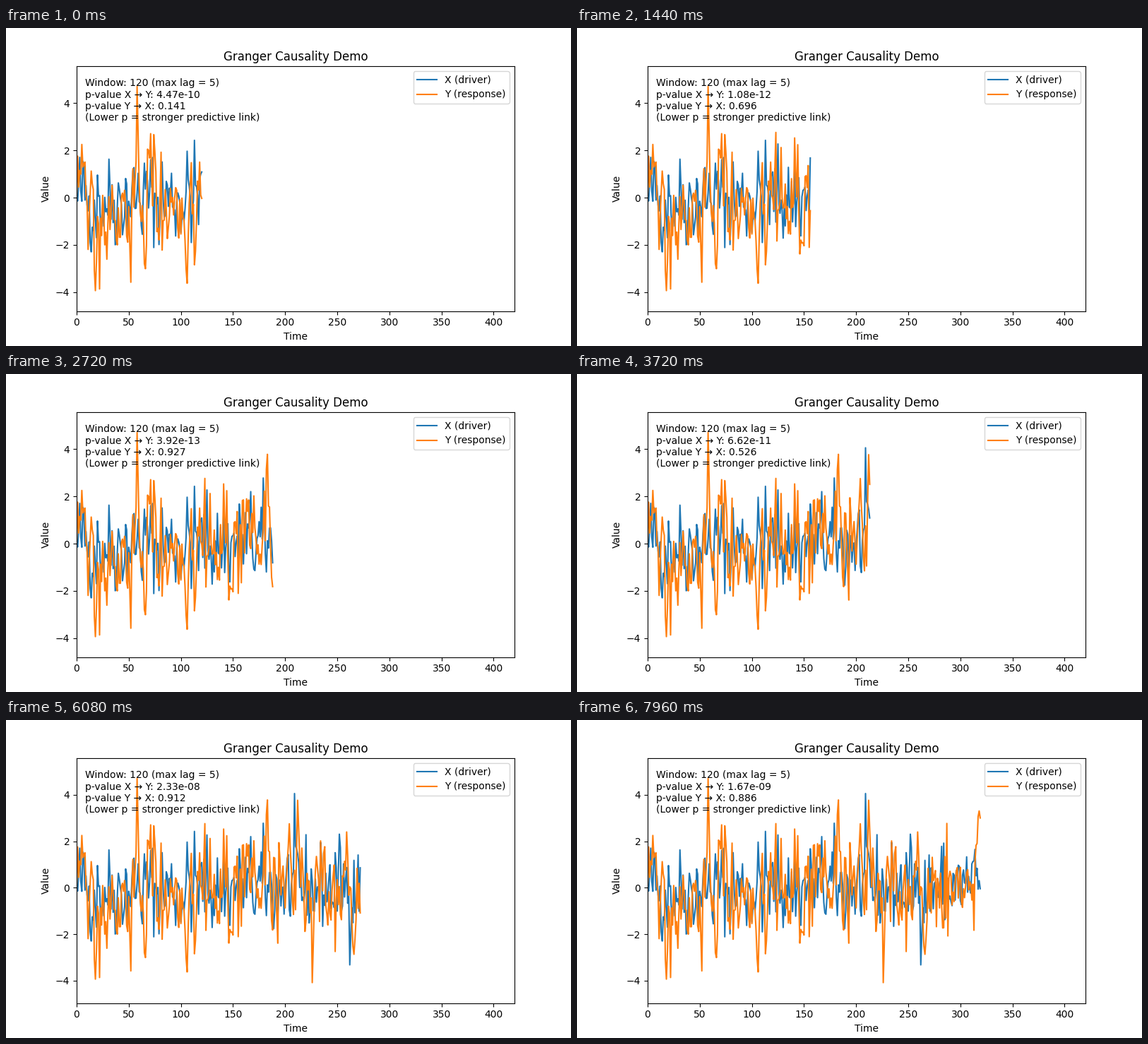
These frames come from a looping animation (800 by 450 pixels, 8 s). A matplotlib script:

```python
import math

import matplotlib.pyplot as plt
import numpy as np
from matplotlib.animation import FuncAnimation

N, WINDOW, LAG = 420, 120, 5
FRAMES, INTERVAL = 200, 40


def simulate():
    np.random.seed(42)
    ex = np.random.randn(N)
    ey = np.random.randn(N)
    x, y = np.zeros(N), np.zeros(N)
    for t in range(1, N):
        x[t] = 0.3 * x[t - 1] + ex[t]
        y[t] = 0.4 * y[t - 1] + ey[t]
        if t >= 3:
            y[t] += 0.8 * x[t - 3]
    return x, y


def beta_inc(a, b, z):
    """Regularised incomplete beta function by its power series."""
    log_front = (a * math.log(z) + b * math.log(1 - z) - math.log(a)
                 + math.lgamma(a + b) - math.lgamma(a) - math.lgamma(b))
    term = total = 1.0
    for k in range(20000):
        term *= z * (a + b + k) / (a + 1 + k)
        total += term
        if term < 1e-12 * total:
            break
    return math.exp(log_front) * total


def rss(target, columns):
    design = np.column_stack([np.ones(len(target))] + columns)
    coef = np.linalg.lstsq(design, target, rcond=None)[0]
    return np.sum((target - design @ coef) ** 2)


def granger_p(cause, effect):
    """F-test p-value that lags of cause help to predict effect."""
    def lags(s):
        return [s[LAG - k:len(s) - k] for k in range(1, LAG + 1)]

    target = effect[LAG:]
    small = rss(target, lags(effect))
    full = rss(target, lags(effect) + lags(cause))
    dof = len(target) - 2 * LAG - 1
    f = (small - full) / LAG / (full / dof)
    return beta_inc(dof / 2, LAG / 2, dof / (dof + LAG * f))


x, y = simulate()
time = np.arange(N)

fig, ax = plt.subplots(figsize=(8, 4.5), dpi=100)
line_x, = ax.plot([], [], label="X (driver)")
line_y, = ax.plot([], [], label="Y (response)")
ax.set_xlim(0, N)
ax.set_title("Granger Causality Demo")
ax.set_xlabel("Time")
ax.set_ylabel("Value")
ax.legend(loc="upper right")
info = ax.text(0.02, 0.95, "", transform=ax.transAxes, va="top")


def update(frame):
    now = WINDOW + frame
    shown = slice(0, now + 1)
    line_x.set_data(time[shown], x[shown])
    line_y.set_data(time[shown], y[shown])

    low = min(x[shown].min(), y[shown].min())
    high = max(x[shown].max(), y[shown].max())
    pad = 0.1 * (high - low)
    ax.set_ylim(low - pad, high + pad)

    wx, wy = x[now - WINDOW:now], y[now - WINDOW:now]
    info.set_text(
        f"Window: {WINDOW} (max lag = {LAG})\n"
        f"p-value X → Y: {granger_p(wx, wy):.3g}\n"
        f"p-value Y → X: {granger_p(wy, wx):.3g}\n"
        "(Lower p = stronger predictive link)")
    return line_x, line_y, info


anim = FuncAnimation(fig, update, frames=FRAMES, interval=INTERVAL,
                     repeat=True, repeat_delay=0)
plt.show()
```
